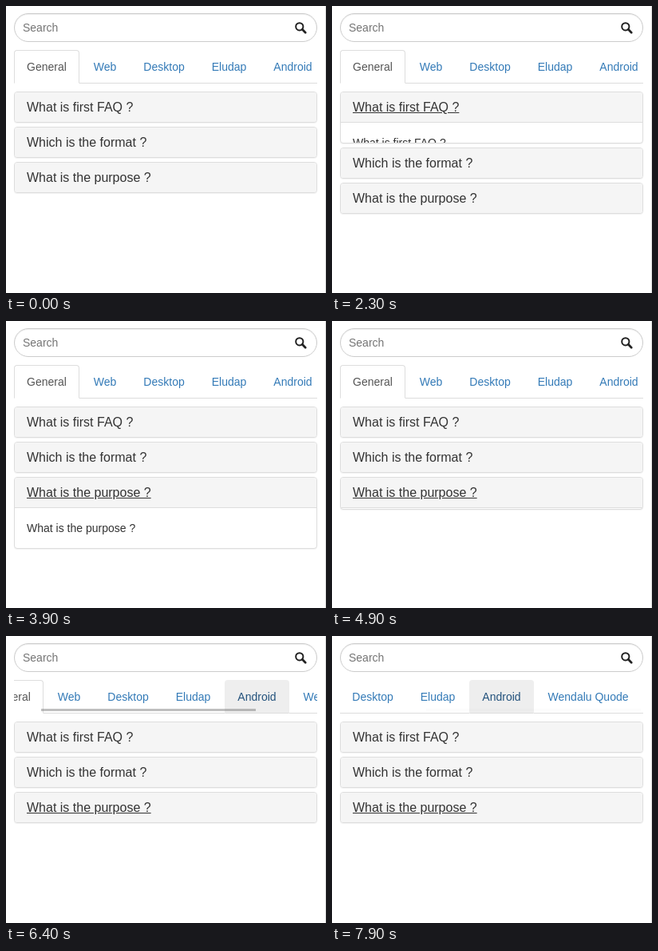
These frames come from a looping animation (401x359 px, 8000 ms). An HTML page:

```html
<!DOCTYPE html>
<html lang="en">
<head>
<meta charset="utf-8">
<title>FAQ</title>
<style>
  * { box-sizing: border-box; }
  html, body { margin: 0; width: 100%; height: 100%; overflow: hidden; background: #fff; }
  body { font: 14px/20px "Liberation Sans", Arial, sans-serif; color: #333; }
  #stage { position: relative; width: 401px; height: 359px; overflow: hidden; border-right: 1px solid #ddd; }
  .search {
    position: absolute; left: 10px; top: 9px; width: 380px; height: 36px;
    border: 1px solid #ccc; border-radius: 18px; padding-left: 10px;
    line-height: 34px; color: #757575; box-shadow: inset 0 1px 1px rgba(0, 0, 0, .075);
  }
  .search svg { position: absolute; left: 351px; top: 10px; }
  .nav {
    position: absolute; left: 10px; top: 55px; width: 380px; height: 42px;
    overflow: hidden; background: linear-gradient(#ddd, #ddd) 0 41px / 100% 1px no-repeat;
  }
  #tabs { display: flex; }
  .tab {
    flex: none; height: 42px; margin-right: 2px; padding: 10px 15px; white-space: nowrap;
    border: 1px solid transparent; border-radius: 4px 4px 0 0; color: #337ab7;
  }
  .tab.active { color: #555; background: #fff; border-color: #ddd #ddd #fff; }
  .tab.hover { color: #23527c; background: #eee; border-color: #eee #eee #ddd; }
  #thumb { position: absolute; left: 2px; top: 36px; width: 269px; height: 3px; background: rgba(128, 128, 128, .5); }
  .panels { position: absolute; left: 10px; top: 107px; width: 380px; }
  .panel {
    margin-bottom: 5px; border: 1px solid #ddd; border-radius: 4px;
    overflow: hidden; background: #fff; box-shadow: 0 1px 1px rgba(0, 0, 0, .05);
  }
  .title { height: 37px; padding: 10px 15px; background: #f5f5f5; font-size: 16px; line-height: 17px; }
  .title.hover { text-decoration: underline; }
  .fold { height: 0; overflow: hidden; }
  .answer { height: 51px; padding: 15px; border-top: 1px solid #ddd; }
</style>
</head>
<body>
<div id="stage">
  <div class="search">Search
    <svg width="16" height="16" fill="none" stroke="#222">
      <circle cx="5.8" cy="5.8" r="4.6" stroke-width="2"/>
      <path d="M9.3 9.3L13.2 13.2" stroke-width="2.8" stroke-linecap="round"/>
    </svg>
  </div>
  <div class="nav">
    <div id="tabs"></div>
    <div id="thumb"></div>
  </div>
  <div class="panels" id="panels"></div>
</div>
<script>
const LOOP = 8000, STEP = 100, FOLD_MS = 350, BODY_H = 51, MAX_SCROLL = 147;
const $ = id => document.getElementById(id);

function add(parent, cls, text = '') {
  const el = document.createElement('div');
  el.className = cls;
  el.textContent = text;
  return parent.appendChild(el);
}

const tabs = ['General', 'Web', 'Desktop', 'Eludap', 'Android', 'Wendalu Quode']
  .map(name => add($('tabs'), 'tab', name));
tabs[0].classList.add('active');

const panels = ['What is first FAQ ?', 'Which is the format ?', 'What is the purpose ?'].map(text => {
  const box = add($('panels'), 'panel');
  const title = add(box, 'title', text);
  const fold = add(box, 'fold');
  add(fold, 'answer', text);
  return { title, fold };
});

// CSS "ease": cubic-bezier(.25, .1, .25, 1)
function ease(x) {
  if (x <= 0) return 0;
  if (x >= 1) return 1;
  let lo = 0, hi = 1, s;
  for (let i = 0; i < 24; i++) {
    s = (lo + hi) / 2;
    if (0.75 * s * (1 - s) + s ** 3 < x) lo = s; else hi = s;
  }
  return 0.3 * s * (1 - s) ** 2 + 3 * s * s * (1 - s) + s ** 3;
}

const travel = (t, start) => Math.ceil(BODY_H * ease((t - start) / FOLD_MS));
const foldHeight = (t, open, close) => travel(t, open) - travel(t, close);

// Steady drag, slowing down towards the end
function scrollAt(t) {
  if (t <= 6000) return 0;
  if (t <= 6900) return Math.round((t - 6000) / 900 * 102);
  const n = (t - 6900) / 100;
  return n >= 5 ? MAX_SCROLL : Math.round(102 + 11.3 * n - 0.46 * n * n);
}

function thumbAlpha(t) {
  if (t < 6100) return 0;
  if (t < 7800) return 1;
  return t < 7900 ? 0.5 : 0.05;
}

function render(now) {
  const t = Math.floor(now % LOOP / STEP) * STEP;
  panels[0].fold.style.height = foldHeight(t, 1100, 2200) + 'px';
  panels[2].fold.style.height = foldHeight(t, 3550, 4650) + 'px';
  panels[0].title.classList.toggle('hover', t >= 1200 && t < 3600);
  panels[2].title.classList.toggle('hover', t >= 3600);
  tabs[4].classList.toggle('hover', t >= 6000);

  const scroll = scrollAt(t);
  $('tabs').style.transform = `translateX(${-scroll}px)`;
  $('thumb').style.transform = `translateX(${Math.floor(scroll * 106 / MAX_SCROLL)}px)`;
  $('thumb').style.opacity = thumbAlpha(t);
}

const begin = performance.now();
function tick() {
  render(performance.now() - begin);
  requestAnimationFrame(tick);
}
tick();
</script>
</body>
</html>
```
